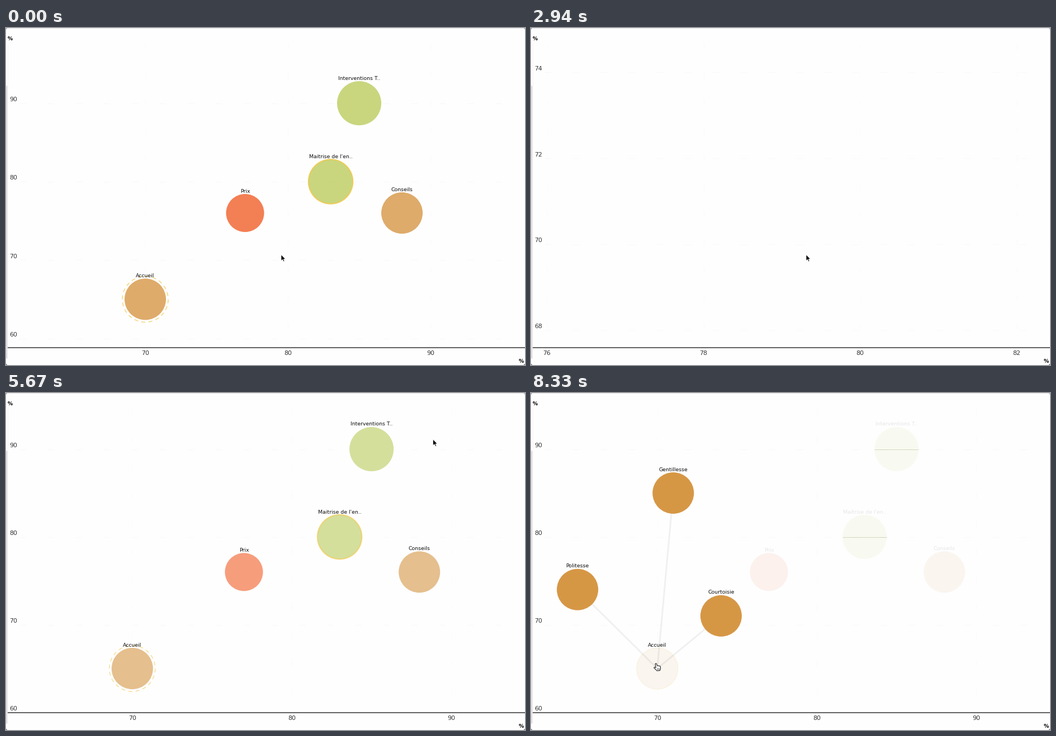
Write a matplotlib script that moves like this. It is 928x603 px and loops after 8.4 s.

```python
import numpy as np
import matplotlib.pyplot as plt
from matplotlib.animation import FuncAnimation
from matplotlib.patches import Circle, Polygon, Rectangle

W, H, DPI = 928, 603, 64
STEP, FRAMES = 70, 120
PX = 72 / DPI

GREEN = (188 / 255, 204 / 255, 94 / 255)
CORAL = (241 / 255, 96 / 255, 42 / 255)
BROWN = (214 / 255, 151 / 255, 69 / 255)
GOLD = (240 / 255, 198 / 255, 70 / 255)
INK = "#333333"

# name, x value, y value, radius, colour
BUBBLES = [
    ("Interventions T..", 85, 90, 39.5, GREEN),
    ("Maitrise de l'en..", 83, 80, 39.5, GREEN),
    ("Prix", 77, 76, 34, CORAL),
    ("Conseils", 88, 76, 37, BROWN),
    ("Accueil", 70, 65, 37, BROWN),
]
CHILDREN = [("Gentillesse", 71, 85), ("Politesse", 65, 74), ("Courtoisie", 74, 71)]

# A view is: pixel of x=80, pixels per x unit, pixel of y=70, pixels per y unit
START = np.array([504, 25.5, 415.2, 14.03])
MIDDLE = np.array([540.5, 71.1, 404, 39.1])
CLOSE = np.array([588.5, 140, 387, 76.9])
FINAL = np.array([511, 28.52, 414.5, 15.7])
HALF_OUT = FINAL + 0.268 * (CLOSE - FINAL)

# scroll begins, scroll ends, view reached
SCROLLS = [
    (390, 850, MIDDLE),
    (1850, 2310, CLOSE),
    (3250, 3560, HALF_OUT),
    (4340, 4393, FINAL),
]

# time, x, y of the pointer tip
PATH = [
    (0, 492, 405.5), (3950, 492, 405.5), (4250, 507, 405.5), (4800, 507, 405.5),
    (5040, 682, 280), (5400, 750, 120), (5720, 766, 76), (5950, 490, 283),
    (6160, 217, 488.5), (8190, 217, 488.5), (8330, 222.5, 484),
]
HOVER, FADE, SPREAD = 6160, 6325, 6350


def clamp(u):
    return min(max(u, 0.0), 1.0)


def cubic(u):
    u = clamp(u)
    return 4 * u ** 3 if u < 0.5 else 1 - 4 * (1 - u) ** 3


def axis_view(t):
    view = START
    for begin, end, goal in SCROLLS:
        if t < begin:
            break
        u = clamp((t - begin) / (end - begin))
        ratio = goal[1] / view[1]
        view = view + (ratio ** u - 1) / (ratio - 1) * (goal - view)
    return view


def bubble_view(t):
    view = START
    stops = [s[0] for s in SCROLLS[1:]] + [STEP * FRAMES]
    for (_, end, goal), stop in zip(SCROLLS, stops):
        if t < end:
            break
        view = view + cubic((min(t, stop) - end) / 1000) * (goal - view)
    return view


def place(view, x, y):
    return view[0] + view[1] * (x - 80), view[2] - view[3] * (y - 70)


def ticks(low, high, count=4):
    span = high - low
    step = 10 ** np.floor(np.log10(span / count))
    err = count / span * step
    step *= 10 if err <= 0.15 else 5 if err <= 0.35 else 2 if err <= 0.75 else 1
    return np.arange(np.ceil(low / step), np.floor(high / step) + 1) * step


fig = plt.figure(figsize=(W / DPI, H / DPI), dpi=DPI, facecolor="#fefefe")
ax = fig.add_axes([0, 0, 1, 1])
plot_box = Rectangle((3, 27), 925, 544.5, transform=ax.transData)
label_box = Rectangle((3, 15), 925, 556.5, transform=ax.transData)


def text(x, y, s, size, ha="center", **kw):
    return ax.text(x, y, s, fontsize=size * PX, family="DejaVu Sans", ha=ha,
                   va="baseline", **kw)


def line(xs, ys, color, width, **kw):
    return ax.plot(xs, ys, color=color, lw=width * PX, solid_capstyle="butt",
                   dash_capstyle="butt", **kw)[0]


def disc(x, y, r, color, alpha):
    patch = ax.add_patch(Circle((x, y), r, fc=color, ec="none", alpha=alpha, zorder=4))
    patch.set_clip_path(plot_box)


def ring(x, y, r, width, alpha, style="-"):
    patch = ax.add_patch(Circle((x, y), r, fc="none", ec=GOLD, lw=width * PX,
                                ls=style, alpha=alpha, zorder=4.2, capstyle="butt"))
    patch.set_clip_path(plot_box)


def caption(x, y, r, name, alpha=1.0):
    label = text(x, y - r - 2.5, name, 9.4, color="#111111", alpha=alpha,
                 zorder=6, clip_on=True)
    label.set_clip_path(label_box)


def draw_frame_parts():
    ax.set_xlim(0, W)
    ax.set_ylim(H, 0)
    ax.axis("off")
    line([0, W], [0.3, 0.3], "#dedede", 0.8)
    line([0.5, 0.5], [103, 591], "#bcbcbc", 1)
    line([3, 3], [27, 571], "#f4f4f4", 1)
    for cx in (0, W):
        for cy in (0, H):
            dx, dy = (2.5 if cx == 0 else -2.5), (2.5 if cy == 0 else -2.5)
            ax.add_patch(Polygon([(cx, cy), (cx + dx, cy), (cx, cy + dy)],
                                 fc="#777777", ec="none"))
    line([3, W], [571.7, 571.7], "#484848", 1.7, zorder=5)
    text(7.5, 21.8, "%", 9.3, color="black", weight="bold")
    text(921, 598.8, "%", 9.3, color="black", weight="bold")


def draw_axes(view):
    x80, sx, y70, sy = view
    dash = (0, (12 / 0.8, 38 / 0.8))
    for v in ticks(80 + (3 - x80) / sx, 80 + (925 - x80) / sx):
        x = x80 + sx * (v - 80)
        line([x, x], [27, 571], "#f9f9f9", 0.8, ls=dash, zorder=1)
        text(x, 585, f"{v:.0f}", 11, color=INK)
    for v in ticks(70 + (y70 - 571.8) / sy, 70 + (y70 - 27) / sy):
        y = y70 - sy * (v - 70)
        line([24, 925], [y, y], "#f7f7f7", 0.8, ls=dash, zorder=1)
        text(6, y - 3.6, f"{v:.0f}", 11, ha="left", color=INK)


def draw_bubbles(t, view):
    faded = cubic((t - FADE) / 500)
    text_fade = cubic((t - SPREAD) / 1000)
    alpha = 0.8 - 0.19 * clamp((t - 390) / 300) - 0.53 * faded
    for name, x, y, r, color in BUBBLES:
        px, py = place(view, x, y)
        if not (-60 < px < W + 60 and -60 < py < H + 60):
            continue
        disc(px, py, r, color, alpha)
        if name.startswith("Maitrise") and t < FADE - 30:
            ring(px, py, 39.7, 2.2, alpha)
        if name == "Accueil":
            if t < HOVER:
                ring(px, py, 41, 1.3, alpha, (0, (7 / 1.3, 5.88 / 1.3)))
            else:
                ring(px, py, 37, 2.2, alpha)
        if color == GREEN and faded > 0:
            line([px - r, px + r], [py, py], "#7f8a50", 1, alpha=0.3 * faded, zorder=4.1)
        caption(px, py, r, name, 1 if name == "Accueil" else 1 - 0.9 * text_fade)


def draw_children(t, view):
    p = cubic((t - SPREAD) / 1000)
    if p <= 0:
        return
    home = np.array(place(view, 70, 65))
    for name, x, y in CHILDREN:
        px, py = home + p * (np.array(place(view, x, y)) - home)
        line([home[0], px], [home[1], py], "black", 3, alpha=0.055, zorder=4.3)
        ax.add_patch(Circle((px, py), 37 * p, fc=BROWN, ec="none", zorder=4.5))
        caption(px, py, 37 * p, name, p)


def draw_pointer(t):
    times, xs, ys = zip(*PATH)
    x, y = np.interp(t, times, xs), np.interp(t, times, ys)
    if t < HOVER:
        shape = [(0, 0), (0, 11), (2.6, 8.7), (4.4, 12.6), (6, 11.9),
                 (4.4, 8.1), (7.8, 8.1)]
        fill, edge, width = "black", "white", 0.7
    else:
        shape = [(-0.4, 0.6), (0.8, -0.2), (2, 0.6), (3.3, 4.2), (5, 3.8), (6.4, 4.4),
                 (8, 4.5), (9, 6), (9, 9.5), (8, 12.6), (2.6, 13), (0.4, 10.6),
                 (-2.6, 8), (-2.2, 6.6), (-0.6, 6.8), (0.8, 7.6)]
        fill, edge, width = "white", "#222222", 1.1
    ax.add_patch(Polygon([(x + a, y + b) for a, b in shape], fc=fill, ec=edge,
                         lw=width * PX, joinstyle="round", zorder=9))
    if t >= HOVER:
        for k in range(3):
            line([x + 3 + 1.8 * k] * 2, [y + 7.5, y + 10.5], "#444444", 0.7, zorder=10)


def draw(i):
    t = i * STEP
    ax.clear()
    draw_frame_parts()
    draw_axes(axis_view(t))
    view = bubble_view(t)
    draw_bubbles(t, view)
    draw_children(t, view)
    draw_pointer(t)
    return []


anim = FuncAnimation(fig, draw, frames=FRAMES, interval=STEP, init_func=lambda: [],
                     repeat=True, repeat_delay=0, blit=False)
plt.show()
```
